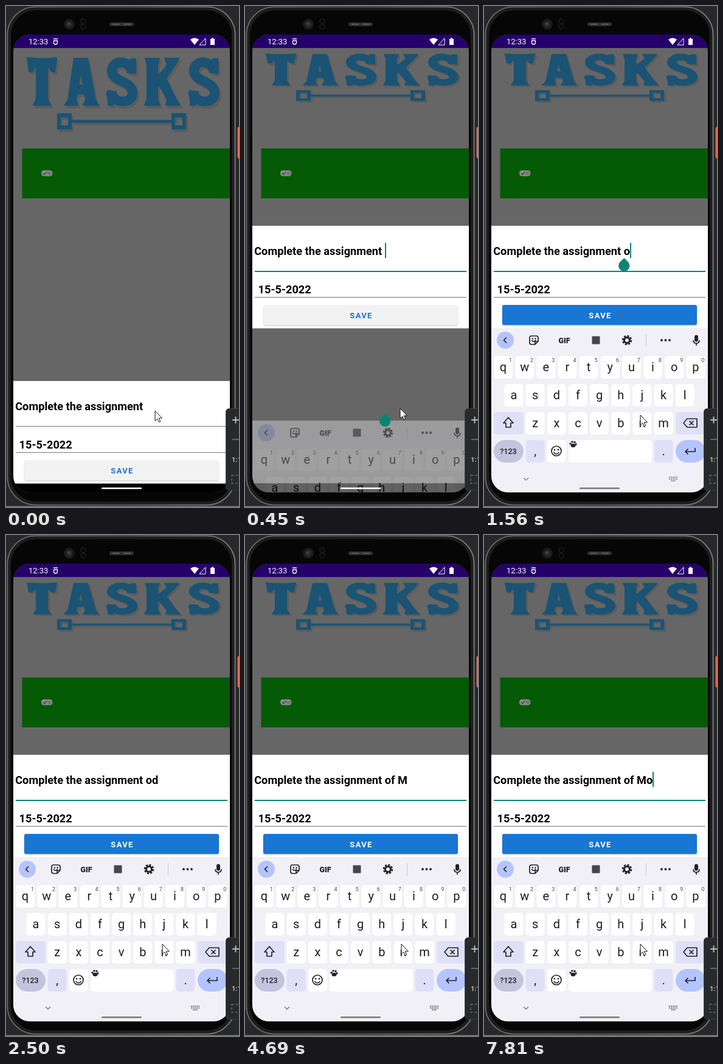
An HTML page that plays this animation: 383x823 px, repeating every 8 s.

```html
<!DOCTYPE html>
<html lang="en">
<head>
<meta charset="utf-8">
<title>Task entry</title>
<style>
html, body { margin: 0; width: 100%; height: 100%; overflow: hidden; background: #26282a; }
svg { display: block; width: 383px; height: 823px; font-family: Roboto, sans-serif; }
.field { font-weight: 700; font-size: 18.22px; white-space: pre; }
.line { fill: none; stroke: #202124; stroke-width: 1.7; stroke-linejoin: round; }
.key { font-size: 20px; text-anchor: middle; fill: #1c1d22; }
.hint { font-size: 9px; text-anchor: middle; fill: #44464e; }
</style>
</head>
<body>
<svg viewBox="0 0 383 823">
  <defs>
    <clipPath id="screen"><rect x="12" y="47" width="356" height="752" rx="27"/></clipPath>
    <linearGradient id="rim" x2="1">
      <stop stop-color="#66686a"/><stop offset=".5" stop-color="#55575a"/><stop offset="1" stop-color="#77797b"/>
    </linearGradient>
    <g id="curl">
      <path d="M206 108C203 88 173 87 173 107C173 125 207 122 207 143C207 162 174 161 171 141" fill="none" stroke="currentColor" stroke-width="16"/>
      <path d="M204 87H212V111L198 109ZM166 139L180 141L175 163H167Z"/>
    </g>
    <g id="logo" fill="currentColor" fill-rule="evenodd">
      <g stroke="currentColor" stroke-width="2" stroke-linejoin="round">
        <path d="M35 85Q59 88 83 85L80 108H75L71 101H68V152L73 163H45L50 152V101H47L43 108H38Z"/>
        <path d="M112 86H134L147 154L152 163H127L131 154L129 144H117L115 154L118 163H96L102 154ZM123 107L119 130H127Z"/>
        <use href="#curl" x="1"/>
        <path d="M229 86H252L249 97V116L265 97L261 86H284L278 97L263 119L279 152L286 163H263L265 154L252 130L249 134V153L253 163H228L232 153V97Z"/>
        <use href="#curl" x="136"/>
      </g>
      <path d="M84 176H108V187H272V176H296V203H272V192H108V203H84ZM90 183V196H102V183ZM278 183V196H290V183Z"/>
    </g>
  </defs>

  <!-- handset -->
  <rect width="383" height="823" fill="#26282a"/>
  <rect y="821.5" width="383" height="1.5" fill="#77797b"/>
  <rect x="2.5" y="1.5" width="374" height="818" rx="46" fill="#060606" stroke="url(#rim)" stroke-width="2"/>
  <rect x="6" y="5" width="367" height="811" rx="43" fill="none" stroke="#1e1e1f" stroke-width="4"/>
  <circle cx="104" cy="30" r="9" fill="#191a1b"/><circle cx="104" cy="30" r="5" fill="#2b2d2e"/><circle cx="103" cy="29" r="2" fill="#444"/>
  <g fill="none" stroke="#1f2021" stroke-width="1.5"><circle cx="127" cy="25" r="4"/><circle cx="127" cy="34" r="4"/></g>
  <rect x="170" y="27" width="40" height="6" rx="3" fill="#303132"/>
  <path d="M175 30H187M193 30H205" stroke="#575859" stroke-width="2"/>

  <g clip-path="url(#screen)">
    <rect x="12" y="47" width="356" height="752" fill="#666"/>
    <rect x="12" y="47" width="356" height="22" fill="#26006a"/>
    <g fill="#fff">
      <text x="37" y="63" font-size="13">12:33</text>
      <path d="M303 55Q310 50 317 55L310 64Z"/>
      <path d="M318 64L328 53V64Z" fill="none" stroke="#fff"/>
      <path d="M337 54H338V52.5H341V54H343V64H336V54Z"/>
      <path d="M78 54H85M78 57H85M78.5 60A3 3 0 0 0 84.5 60V57M78.5 57V60" fill="none" stroke="#fff" stroke-width="1.3"/>
    </g>
    <g id="title">
      <use href="#logo" x="3" y="4" color="#5d5b59"/>
      <use href="#logo" color="#1a5374"/>
    </g>
    <rect x="26.5" y="234" width="342" height="82" fill="#055a05"/>
    <rect x="58" y="270" width="18.5" height="9.5" rx="4.5" fill="#8b8e8b"/>
    <path d="M61 274.5L63.5 277L67 272" fill="none" stroke="#333" stroke-width="1.2"/>
    <rect x="68" y="272" width="7" height="5.5" rx="2.5" fill="#727672"/>
    <rect x="12" y="784" width="356" height="15" fill="#000"/>

    <!-- entry sheet, placed as with the keyboard up -->
    <g id="sheet">
      <rect x="12" y="361" width="356" height="168.500" fill="#fff"/>
      <text class="field" id="task" x="15.2" y="409"></text>
      <rect id="rule" x="16" width="348"/>
      <text class="field" x="21.5" y="472">15-5-2022</text>
      <rect x="16" y="478" width="348" height="1" fill="#777"/>
      <rect x="29.5" y="492" width="321" height="34" rx="4" fill="#000" opacity=".13"/>
      <rect id="button" x="30" y="491" width="320" height="33" rx="3"/>
      <text id="save" x="191" y="513" font-size="13" font-weight="700" letter-spacing="1.3" text-anchor="middle">SAVE</text>
      <rect id="caret" y="389" width="2" height="25" fill="#078675"/>
    </g>

    <g id="board">
      <rect x="12" y="529" width="356" height="270" fill="#f1f0f7"/>
      <g id="keys"></g>
      <circle cx="35" cy="549" r="14" fill="#b6c4fc"/>
      <g class="line">
        <path d="M37 544.5L32.5 549L37 553.5"/>
        <path d="M75 545Q75 542 78 542H86Q89 542 89 545V551L84 556H78Q75 556 75 553ZM89 551H84V556M78 549Q81 553 85 549"/>
        <circle cx="235" cy="549" r="4.5" stroke-width="3"/>
        <circle cx="235" cy="549" r="7" stroke-width="2.5" stroke-dasharray="3.3 2.2"/>
        <path d="M344 549Q344 554 349 554T354 549M349 554V558"/>
        <path d="M32 685L40 676L48 685H44V692H36V685Z"/>
        <path d="M328 685L334 678H350V692H334ZM337.5 681.5L344.5 688.5M344.5 681.5L337.5 688.5"/>
        <circle cx="119" cy="731" r="8"/><path d="M114.5 733Q119 739 123.5 733"/>
        <path d="M347 726V732H331M335.5 727.5L331 732L335.5 736.5"/>
      </g>
      <g fill="#202124">
        <text x="132" y="553.5" font-size="12.5" font-weight="900" text-anchor="middle">GIF</text>
        <rect x="177.5" y="542.5" width="13" height="13" rx="1" fill="#44464a"/>
        <circle cx="292" cy="549" r="1.9"/><circle cx="298.5" cy="549" r="1.9"/><circle cx="305" cy="549" r="1.9"/>
        <rect x="346" y="540.5" width="6" height="11" rx="3"/>
        <circle cx="80" cy="546.5" r="1.2"/><circle cx="84.5" cy="546.5" r="1.2"/>
        <circle cx="116" cy="729" r="1.3"/><circle cx="122" cy="729" r="1.3"/>
        <circle cx="142" cy="719" r="1.7"/><circle cx="145" cy="716" r="1.7"/><circle cx="149" cy="716.5" r="1.7"/><circle cx="151" cy="720" r="1.7"/>
        <ellipse cx="146.5" cy="722" rx="4" ry="3"/>
        <text x="40" y="735.5" font-size="12.5" font-weight="500" text-anchor="middle">?123</text>
      </g>
      <rect x="266" y="539" width="1" height="21" fill="#c9c9d2"/>
    </g>

    <g id="nav" fill="none" stroke="#777a80">
      <path d="M65 775L69 779L73 775" stroke-width="1.5"/>
      <path d="M304 774H318M304 777H318" stroke-width="1.8" stroke-dasharray="2 1"/>
      <path d="M307 780H315" stroke-width="1.5"/>
    </g>
    <rect x="157" y="791" width="66" height="2.5" rx="1.2" fill="#fff"/>
    <rect id="pill" x="157" y="791" width="66" height="2.5" rx="1.2" fill="#77777b"/>
    <path id="handle" d="M230.5 414L237 420.5A9.2 9.2 0 1 1 223.5 420.5Z" fill="#078675"/>
  </g>

  <path id="mouse" d="M0 0V16.5L3.8 13L6.3 18.6L8.8 17.5L6.3 12H11.5Z" fill="#fff" stroke="#111"/>

  <!-- window edge -->
  <rect x="380.5" y="198" width="8" height="53" rx="4" fill="#e9694f"/>
  <rect x="361.5" y="661.5" width="30" height="134" rx="5" fill="#28292b" stroke="#3a3b3d"/>
  <path d="M372 680H383M377.5 674.5V685.5" stroke="#bbb" stroke-width="2"/>
  <path d="M372 712H383" stroke="#777" stroke-width="1.5"/>
  <text x="371" y="749" font-size="11" font-weight="700" fill="#bbb">1:1</text>
  <rect x="371" y="771" width="16" height="13" fill="none" stroke="#666" stroke-width="1.5" stroke-dasharray="4 3"/>
</svg>
<script>
const $ = id => document.getElementById(id);
const set = (id, attrs) => { for (const k in attrs) $(id).setAttribute(k, attrs[k]); };
// Values of the last row whose time has passed
const at = (rows, t) => rows.filter(r => r[0] <= t).pop().slice(1);

const STEM = 'Complete the assignment';
const typing = [
  [0, '', 0], [340, ' ', 1], [900, ' ', 0], [1350, ' ', 1], [1560, ' o', 1],
  [1920, ' od', 1], [2040, ' od ', 1], [2500, ' od ', 0], [3060, ' od ', 1],
  [3170, ' od', 1], [3390, ' o', 1], [3510, ' of', 1], [3620, ' of ', 1],
  [4110, ' of ', 0], [4230, ' of M', 1], [4690, ' of M', 0], [5270, ' of M', 1],
  [5520, ' of Mo', 1], [5980, ' of Mo', 0], [6080, ' of Mob', 1], [6320, ' of Mobi', 1],
  [6760, ' of Mob', 1], [6890, ' of Mo', 1], [7130, ' of M', 1], [7590, ' of M', 0], [7810, ' of Mo', 1]
];
const rise = [[0, 270, 0], [450, 152, .38], [560, 10, 1], [680, 1, 1], [790, 0, 1]];
const navFade = [[0, 0, 0], [560, .1, 0], [680, .3, .2], [790, .5, .4], [900, .7, .6],
  [1140, .85, .9], [1350, .85, 1], [1920, .92, 1], [2040, .97, 1], [2260, 1, 1]];
const pointer = [[0, 245, 665], [120, 250, 663], [230, 255, 661], [680, 256, 667], [790, 257, 672]];

const pen = document.createElement('canvas').getContext('2d');
pen.font = '700 18.22px Roboto, sans-serif';

let keys = '';
function key(x, y, w, fill, label = '', hint = '', r = 5) {
  keys += `<rect x="${x - w / 2}" y="${y - 18}" width="${w}" height="37" rx="${r}" fill="${fill}"/>
    <text class="key" x="${x}" y="${y + 7}">${label}</text><text class="hint" x="${x + 12}" y="${y - 8}">${hint}</text>`;
}
const row = (letters, x, y, hints = '') =>
  [...letters].forEach((c, i) => key(x + i * 35.15, y, 31, '#fff', c, hints[i]));
row('qwertyuiop', 31.5, 593, '1234567890');
row('asdfghjkl', 49, 639);
row('zxcvbnm', 84.2, 685);
key(40.5, 685, 49, '#dfe0f8');
key(339.5, 685, 49, '#dfe0f8');
key(40.5, 731, 49, '#c3c4dd', '', '', 18.5);
key(84.2, 731, 31, '#dfe0f8', ',');
key(119.3, 731, 31, '#fff');
key(207.5, 731, 137, '#fff');
key(295.1, 731, 31, '#dfe0f8', '.');
key(339.5, 731, 49, '#b4c4ff', '', '', 18.5);
$('keys').innerHTML = keys;

function draw(t) {
  const raised = t >= 450, focused = t >= 340, edited = t >= 1560;
  const [tail, caret] = at(typing, t);
  const [drop, alpha] = at(rise, t);
  const [icons, dark] = at(navFade, t);
  const text = STEM + tail;

  set('title', { transform: raised ? 'translate(0 23) scale(1 .655)' : '' });
  set('sheet', { transform: `translate(0 ${raised ? 0 : 255})` });
  $('task').textContent = text;
  set('caret', { x: Math.round(15.2 + pen.measureText(text).width), opacity: caret });
  set('rule', focused ? { y: 435, height: 2, fill: '#078675' } : { y: 435, height: 1, fill: '#777' });
  set('button', { fill: edited ? '#1976d2' : '#f2f2f3' });
  set('save', { fill: edited ? '#fff' : '#1976d2' });
  set('board', { transform: `translate(0 ${drop})`, opacity: alpha });
  set('nav', { opacity: icons });
  set('pill', { opacity: dark });
  // The drag handle lags one step behind the sheet
  set('handle', { transform: `translate(0 ${t < 560 ? 255 : 0})`, opacity: focused && t < 1680 ? 1 : 0 });
  set('mouse', { transform: `translate(${at(pointer, t)})` });
}

const start = performance.now();
function tick(now) {
  draw(Math.max(0, now - start) % 8000);
  requestAnimationFrame(tick);
}
draw(0);
requestAnimationFrame(tick);
</script>
</body>
</html>
```
